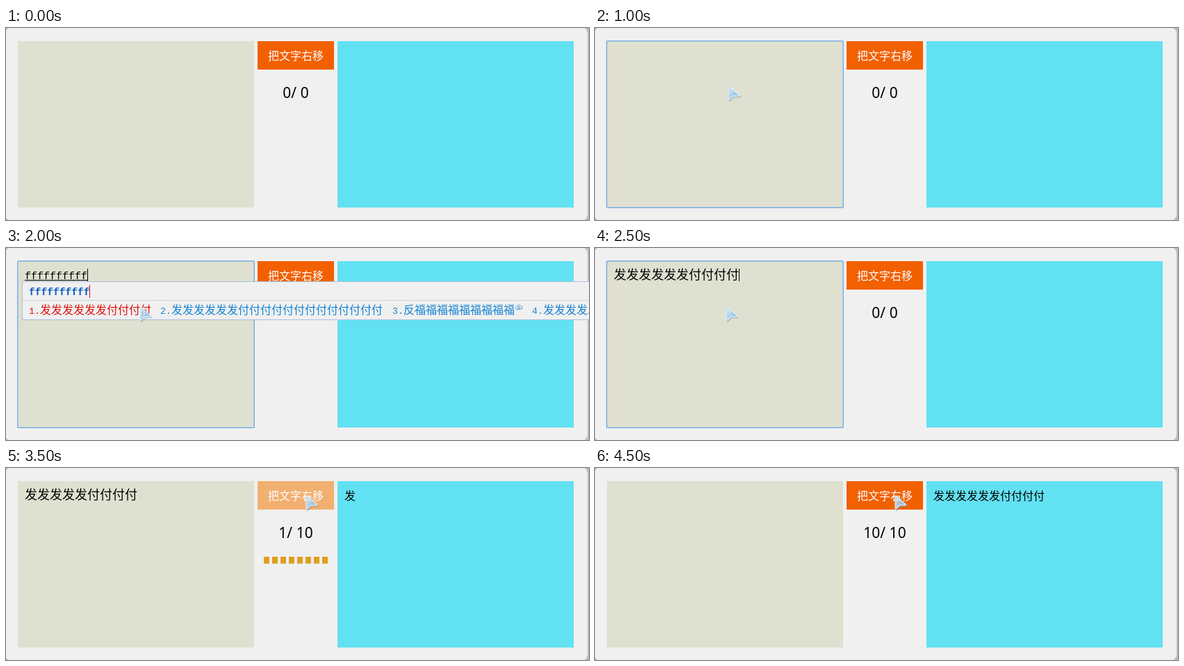
An HTML page for the animation above (5000 ms loop, 839 by 277 pixels).

```html
<!DOCTYPE html>
<html lang="zh">
<head>
<meta charset="utf-8">
<title>把文字右移</title>
<style>
  html, body { margin: 0; width: 100%; height: 100%; overflow: hidden; background: #bdbdbd; }
  svg { display: block; width: 839px; height: 277px; }
  text { font: 16px "Noto Sans CJK SC", "Noto Sans CJK", sans-serif; white-space: pre; }
  .thin { font-weight: 300; }
  #left { font-size: 18px; }
  #count { font: 21px "Noto Sans", "Open Sans", sans-serif; text-anchor: middle; }
  #label { fill: #fff; text-anchor: middle; }
  .half { font: 13.33px "Liberation Mono", monospace; }
  #typed { font: 15px "Liberation Mono", monospace; }
  #spelling { font: bold 14.6px "Liberation Mono", monospace; fill: #0b5fc0; }
  .option { fill: #1684d2; font-weight: 300; }
  .option.first { fill: #e01010; }
  .key { fill: #f4f8fb; stroke: #b9dcf0; }
</style>
</head>
<body>
<svg viewBox="0 0 839 277">
  <defs>
    <linearGradient id="glass" x2="1" y2="1">
      <stop offset="0" stop-color="#eef7fd" stop-opacity=".85"/>
      <stop offset="1" stop-color="#5c9fd8" stop-opacity=".75"/>
    </linearGradient>
  </defs>
  <rect x="-1" y="-1" width="838" height="279" rx="9" fill="#f0f0f0"/>
  <rect x="17" y="19" width="340" height="240" fill="#dfe0d0"/>
  <rect id="focus" x="16.75" y="18.75" width="340.5" height="240.5" rx="1.5" fill="none" stroke="#78afea" stroke-width="1.5"/>
  <rect x="477" y="19" width="340" height="240" fill="#62e1f2"/>
  <rect id="button" x="362" y="19" width="110" height="41"/>
  <text id="label" x="417" y="46">把文字右移</text>
  <text id="count" x="417" y="101"></text>
  <path id="bar" d="M371 133H463" stroke="#dfa01f" stroke-width="10" stroke-dasharray="8 4"/>
  <text id="left" class="thin" x="27" y="45"></text>
  <text id="right" class="thin" x="487" y="46"></text>
  <text id="typed" x="27" y="45"></text>
  <path id="underline" stroke="#000"/>
  <rect id="caret" y="30" width="1" height="18"/>
  <g id="popup">
    <rect id="frame" y="48.5" height="55" fill="#f0f0f0" stroke="#a9bedb"/>
    <path id="divider" stroke="#c9d1dc"/>
    <text id="spelling" y="68"></text>
    <rect id="mark" y="53" width="1" height="19" fill="#e01010"/>
    <g id="options"></g>
    <g id="extras"></g>
  </g>
  <g id="pointer" stroke-linejoin="round">
    <path d="M2 2.5V20.500L7.500 15H16Z" fill="none" stroke="#5c87ad" stroke-opacity=".35" stroke-width="3"/>
    <path d="M1 1V18L6.500 13H14.500Z" fill="none" stroke="#eaf6ff" stroke-width="3"/>
    <path d="M1 1V18L6.500 13H14.500Z" fill="url(#glass)" stroke="#8cc0e8" stroke-opacity=".7"/>
  </g>
</svg>
<script>
const STEP = 500;
const $ = id => document.getElementById(id);
const set = (id, attrs) => Object.entries(attrs).forEach(([k, v]) => $(id).setAttribute(k, v));
const show = (id, on) => $(id).style.display = on ? '' : 'none';

const phrase = '发'.repeat(6) + '付'.repeat(4);

const shortPopup = {
  x: 36, width: 376, typed: 'f', markX: 52,
  options: [[46, '飞'], [92, '发'], [137, '放'], [182, '︿(￣︶￣)︿'], [307, '冯']],
  extras: `<path class="key" d="M352.500 82.500h28v14h-28zM366.500 82.500v14M389.500 82.500h14v14h-14z"/>
    <path d="M361 86.500v6l-3-3z" fill="#a8cbe0"/>
    <path d="M372 86v7l4-3.500zM393 88h7l-3.500 4z" fill="#1684d2"/>
    <circle cx="397" cy="63.500" r="15" fill="#f0966e"/>`
};
const longPopup = {
  x: 23, width: 820, typed: 'f'.repeat(10), markX: 120,
  options: [[33, phrase], [222, '发'.repeat(6) + '付'.repeat(13)],
    [556, '反' + '福'.repeat(9)], [757, phrase]],
  extras: `<path d="M734.500 88.500q-3-2 0-4q3-4 6-1q4 1 2 4q-4 2-8 1z" fill="none" stroke="#4a9cd6"/>
    <circle cx="738" cy="86" r="1.500" fill="none" stroke="#4a9cd6"/>`
};

// One pose per step: pointer position, caret x, and whatever differs from idle.
const poses = [
  {},
  { focus: true, pointer: [192, 84], caret: 27 },
  { focus: true, pointer: [192, 84] },
  { focus: true, pointer: [193, 84], caret: 36, popup: shortPopup },
  { focus: true, pointer: [193, 85], caret: 117, popup: longPopup },
  { focus: true, pointer: [189, 85], caret: 207, left: phrase },
  { focus: true, pointer: [425, 42], left: phrase },
  { pointer: [432, 40], moved: 1 },
  { pointer: [432, 40], moved: 7 },
  { pointer: [432, 40], moved: 10 }
];

const halfWidth = s => s.replace(/[!-~]+/g, m => `<tspan class="half">${m}</tspan>`);

function drawPopup(p) {
  show('popup', p);
  show('underline', p);
  $('typed').textContent = p ? p.typed : '';
  if (!p) return;
  set('frame', { x: p.x + .5, width: p.width });
  set('divider', { d: `M${p.x + 1} 75.500H${p === shortPopup ? 382 : 839}` });
  set('underline', { d: `M27 46.500h${p.typed.length * 9}` });
  set('spelling', { x: p.x + 10 });
  set('mark', { x: p.markX });
  $('spelling').textContent = p.typed;
  $('options').innerHTML = p.options.map(([x, word], i) =>
    `<text class="option${i ? '' : ' first'}" x="${x}" y="95">${halfWidth(`${i + 1}.${word}`)}</text>`).join('');
  $('extras').innerHTML = p.extras;
}

function draw({ focus, pointer, caret, popup, left = '', moved = 0 }) {
  const busy = moved > 0 && moved < phrase.length;
  show('focus', focus);
  show('bar', busy);
  show('caret', caret);
  show('pointer', pointer);
  if (caret) set('caret', { x: caret });
  if (pointer) set('pointer', { transform: `translate(${pointer})` });
  set('button', { fill: busy ? '#f2b070' : '#f26000' });
  $('left').textContent = moved ? phrase.slice(moved) : left;
  $('right').textContent = phrase.slice(0, moved);
  $('count').textContent = `${moved}/ ${moved ? phrase.length : 0}`;
  drawPopup(popup);
}

let start, current = 0;
function tick(now) {
  start ??= now;
  const index = Math.floor((now - start) / STEP) % poses.length;
  if (index !== current) draw(poses[current = index]);
  requestAnimationFrame(tick);
}
draw(poses[0]);
requestAnimationFrame(tick);
</script>
</body>
</html>
```
